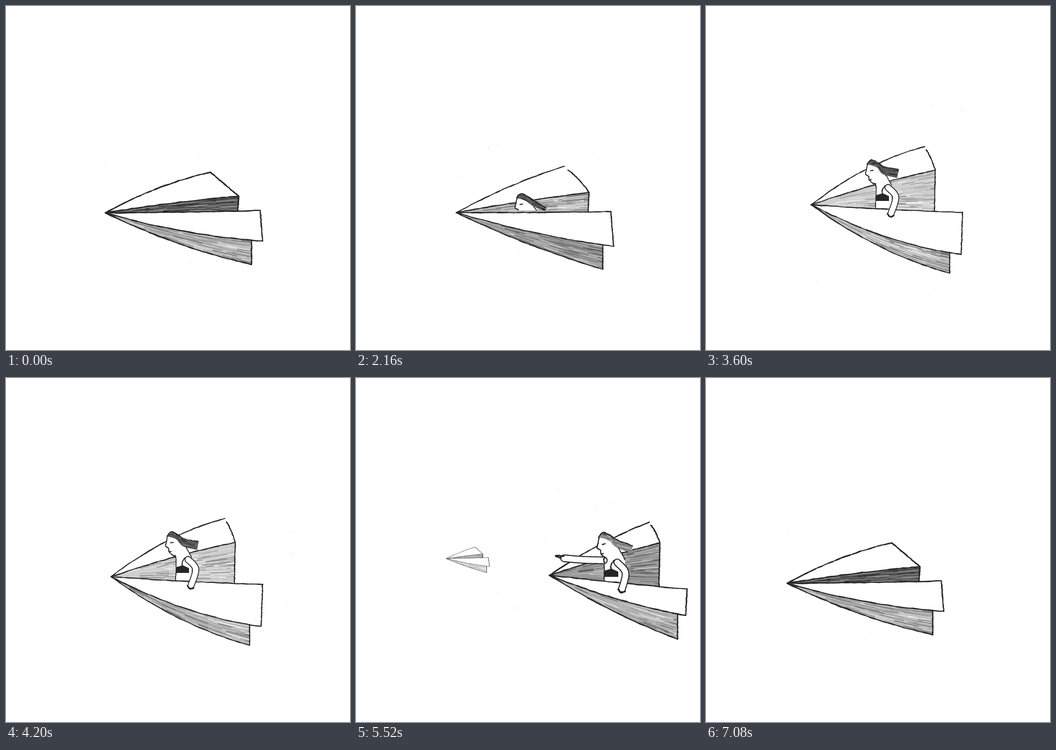
An HTML page with a canvas for the animation above (7.2 s loop, 720x720 px).

```html
<!DOCTYPE html>
<html lang="en">
<head>
<meta charset="utf-8">
<title>Paper plane</title>
<style>
  html, body { margin: 0; width: 100%; height: 100%; overflow: hidden; background: #fff; }
  canvas { display: block; width: 100vw; height: 100vh; }
</style>
</head>
<body>
<canvas id="stage" width="720" height="720"></canvas>
<script>
const LOOP = 7200, STEP = 120, HOLD = 240;
const INK = '#262626', PAPER = '#fff';
const ctx = document.getElementById('stage').getContext('2d');
ctx.lineCap = ctx.lineJoin = 'round';

let seed = 1;
function rnd() {
  seed = (seed + 0x6D2B79F5) | 0;
  let r = Math.imul(seed ^ (seed >>> 15), 1 | seed);
  r = (r + Math.imul(r ^ (r >>> 7), 61 | r)) ^ r;
  return ((r ^ (r >>> 14)) >>> 0) / 4294967296;
}
const jit = a => (rnd() - 0.5) * 2 * a;
const pts = s => s.split(' ').map(p => p.split(',').map(Number));
const mix = (a, b, k) => a + (b - a) * k;
const lerp = (a, b, k) => [mix(a[0], b[0], k), mix(a[1], b[1], k)];
const tip = path => path[path.length - 1];
const grey = v => `rgb(${v},${v},${v})`;

// Corners: nose, then the far ends of top, roof, mid, low and keel.
// Strip and keel give the grey level of the two shaded faces.
const PLANES = {
  dark: { corners: pts('208,433 428,348 487,398 532,428 537,492 514,541'), bend: 0.9, strip: 95, keel: 172, pen: 2.6 },
  light: { corners: pts('206,438 430,348 490,402 533,430 542,499 520,547'), bend: 0.55, strip: 172, keel: 214, pen: 2.1 },
  rideA: {
    corners: pts('222,416 455,298 481,354 534,432 531,516 506,562'), bend: 1, strip: 172, keel: 148, pen: 2.3,
    rider: { at: [337, 333], size: 1, chest: 20, tail: [61, 22], lock: 8, hair: 75, hand: [43, 91] }
  },
  rideB: {
    corners: pts('220,416 458,294 480,344 537,432 534,520 510,559'), bend: 1.5, strip: 192, keel: 172, pen: 2.2,
    rider: { at: [338, 330], size: 1, chest: 17, tail: [65, 12], lock: 18, hair: 75, hand: [49, 105] }
  },
  point: {
    corners: pts('405,413 614,302 636,345 693,442 690,497 673,546'), bend: 0.8, strip: 140, keel: 165, pen: 2.5,
    rider: { at: [509, 332], size: 1.08, chest: 9, tail: [65, 18], lock: 14, hair: 125, hand: [44, 102], reach: [-68, 42] }
  }
};
const SAG = [-10, -3, 1, 10, 11];

// Catmull-Rom through the points, ten samples per span.
function curve(p) {
  const at = i => p[Math.max(0, Math.min(p.length - 1, i))], out = [];
  for (let i = 0; i < p.length - 1; i++) {
    const [a, b, c, d] = [at(i - 1), at(i), at(i + 1), at(i + 2)];
    for (let t = 0; t < 0.95; t += 0.1) {
      out.push([0, 1].map(j => 0.5 * (2 * b[j] + (c[j] - a[j]) * t
        + (2 * a[j] - 5 * b[j] + 4 * c[j] - d[j]) * t * t
        + (3 * b[j] - a[j] - 3 * c[j] + d[j]) * t * t * t)));
    }
  }
  return [...out, tip(p)];
}

// A sagging line from a to b, cut off at the given fraction.
function edge(a, b, sag, end = 1) {
  return Array.from({ length: 31 }, (_, i) => {
    const t = i / 30 * end, p = lerp(a, b, t);
    return [p[0], p[1] + sag * 4 * t * (1 - t)];
  });
}

function trace(path) {
  ctx.beginPath();
  path.forEach(p => ctx.lineTo(...p));
}

function fill(upper, lower, color) {
  trace([...upper, ...[...lower].reverse()]);
  ctx.fillStyle = color;
  ctx.fill();
}

function stroke(path, width, color) {
  trace(path);
  ctx.lineWidth = width;
  ctx.strokeStyle = color;
  ctx.stroke();
}

function line(path, width) {
  let last = path[0];
  for (const p of path.slice(1)) {
    const next = [p[0] + jit(0.5), p[1] + jit(0.5)];
    stroke([last, next], width * (0.75 + rnd() * 0.5), INK);
    last = next;
  }
}
const pen = (p, width) => line(curve(p), width);

// Pencil strokes that follow the two edges of a face.
function shade(upper, lower, level, count) {
  fill(upper, lower, grey(level + 15));
  const end = upper.length - 1;
  for (let i = 0; i < count; i++) {
    const v = 0.04 + rnd() * 0.92, from = Math.floor(Math.sqrt(rnd()) * end);
    const path = upper.map((p, k) => lerp(p, lower[k], v)).slice(from, from + 4 + Math.floor(rnd() * 5));
    stroke(path, 0.8 + rnd() * 1.3, grey(Math.min(245, level + jit(70))));
  }
}

function limb(joints, width, w) {
  const path = curve(joints);
  stroke(path, width + w, INK);
  stroke(path, width - w, PAPER);
}

// The rider is drawn around the hairline above the forehead.
function riderSpace(r, paint) {
  ctx.save();
  ctx.translate(...r.at);
  ctx.scale(r.size, r.size);
  paint();
  ctx.restore();
}

function riderBody(r, w) {
  const c = r.chest, [tx, ty] = r.tail;
  const face = curve([...pts('0,0 -2,12 -4,22 2,26 4,34 11,41'), [c, 43], [c + 1, 60], [c, 93]]);
  const back = curve(pts('30,12 41,28 50,45'));
  fill(face, [...back, [50, 93]], PAPER);
  if (r.reach) {
    const [x, y] = r.reach;
    limb([[c, 46], [c - 40, 45], r.reach], 13, w * 0.8);
    stroke(edge([c, 40], [c, 52], 0), w, PAPER);
    pen([[x, y - 4], [x - 16, y - 5], [x - 6, y]], w);
  }
  line(face, w * 0.75);
  line(back, w * 0.7);
  const crown = curve([...pts('-1,1 8,-8 22,-2 36,7'), r.tail]);
  const nape = curve([...pts('0,2 10,4 21,9'), [32, 13 + r.lock / 2], [tx - 3, ty + r.lock]]);
  shade(crown, nape, r.hair, 25);
  line(crown, w * 0.8);
  pen(pts('6,15 12,14'), w * 0.7);
  pen(pts('3,34 8,33'), w * 0.6);
  fill([[c + 1, 66], [c + 15, 62], [c + 28, 68]], [[c + 1, 78], [c + 28, 78]], INK);
  pen([[c + 14, 64], [c + 14, 55], [c + 20, 46]], w * 0.8);
}

function riderArm(r, w) {
  const [x, y] = r.hand;
  limb([[r.chest + 26, 50], [r.chest + 42, 70], r.hand], 13, w * 0.8);
  pen([[x - 7, y], [x - 2, y + 6], [x + 6, y + 4]], w * 1.2);
}

function specks() {
  for (let i = 0; i < 6; i++) {
    ctx.fillStyle = '#ebebeb';
    ctx.fillRect(155 + rnd() * 460, 176 + rnd() * 436, 3, 2);
  }
}

function plane(p, sink = 0) {
  const w = p.pen, r = p.rider, nose = p.corners[0], ends = p.corners.slice(1);
  const rib = (k, x = ends[k][0]) =>
    edge(nose, ends[k], SAG[k] * p.bend, (x - nose[0]) / (ends[k][0] - nose[0]));
  const [top, roof, mid, low, keel] = ends.map((_, k) => rib(k));
  const stripLow = rib(2, ends[1][0] - 2), finTop = rib(3, ends[4][0]);

  fill(top, roof, PAPER);
  shade(roof, stripLow, p.strip, 110);
  line(top, w);
  line(edge(lerp(tip(top), tip(roof), r ? 0.14 : 0), tip(roof), r ? -4 : 0), w);
  line(roof, w);
  line(edge(tip(roof), tip(stripLow), 0), w);

  if (r) {
    ctx.save();
    if (sink) {
      ctx.beginPath();
      ctx.rect(0, 0, 720, 428);
      ctx.clip();
      ctx.translate(0, sink);
    }
    riderSpace(r, () => riderBody(r, w));
    ctx.restore();
  }

  shade(finTop, keel, p.keel, 110);
  fill(mid, low, PAPER);
  line(mid, w);
  line(edge(tip(mid), tip(low), 0), w);
  line(low, w);
  line(keel, w);
  line(edge(tip(finTop), tip(keel), 0), w);
  if (r && !sink) riderSpace(r, () => riderArm(r, w));
}

function sketch(name, dx = 0, variant = 0) {
  seed = 977 * PLANES[name].corners[0][0] + 5003 * variant;
  ctx.save();
  ctx.translate(dx, 0);
  specks();
  plane(PLANES[name]);
  ctx.restore();
}

// The plane unfolds while the rider rises from inside it.
function emerge(k) {
  const { light, rideA } = PLANES;
  seed = 400 + k * 100;
  specks();
  const corners = light.corners.map((c, i) => lerp(c, rideA.corners[i], k));
  plane({ ...rideA, corners, bend: mix(light.bend, rideA.bend, k) }, 90 * (1 - k));
}

// The second plane grows towards the opening position.
function follow(n, name) {
  const s = 0.269 + 0.0559 * n;
  ctx.save();
  ctx.translate(189 - 1.62 * n, 378 + 4.36 * n);
  ctx.scale(s, s);
  ctx.translate(-206, -438);
  sketch(name);
  ctx.restore();
}

function draw(t) {
  const late = t >= 4200;
  const pose = Math.floor((t - (late ? STEP : 0)) / HOLD), odd = pose % 2;
  ctx.fillStyle = PAPER;
  ctx.fillRect(0, 0, 720, 720);
  if (t < 2160) sketch(odd ? 'light' : 'dark');
  else if (t < 2880) emerge((pose - 8) / 4);
  else if (t < 4680) sketch(odd ? 'rideB' : 'rideA', 0, late ? 1 : 0);
  else {
    const n = (t - 5520) / STEP;
    if (t >= 5160) follow(n, odd ? 'dark' : 'light');
    sketch('point', 45.5 * Math.max(-4, n), odd);
  }
}

let shown = -1;
function tick() {
  const t = Math.floor(performance.now() % LOOP / STEP) * STEP;
  if (t !== shown) draw(shown = t);
  requestAnimationFrame(tick);
}
tick();
</script>
</body>
</html>
```
